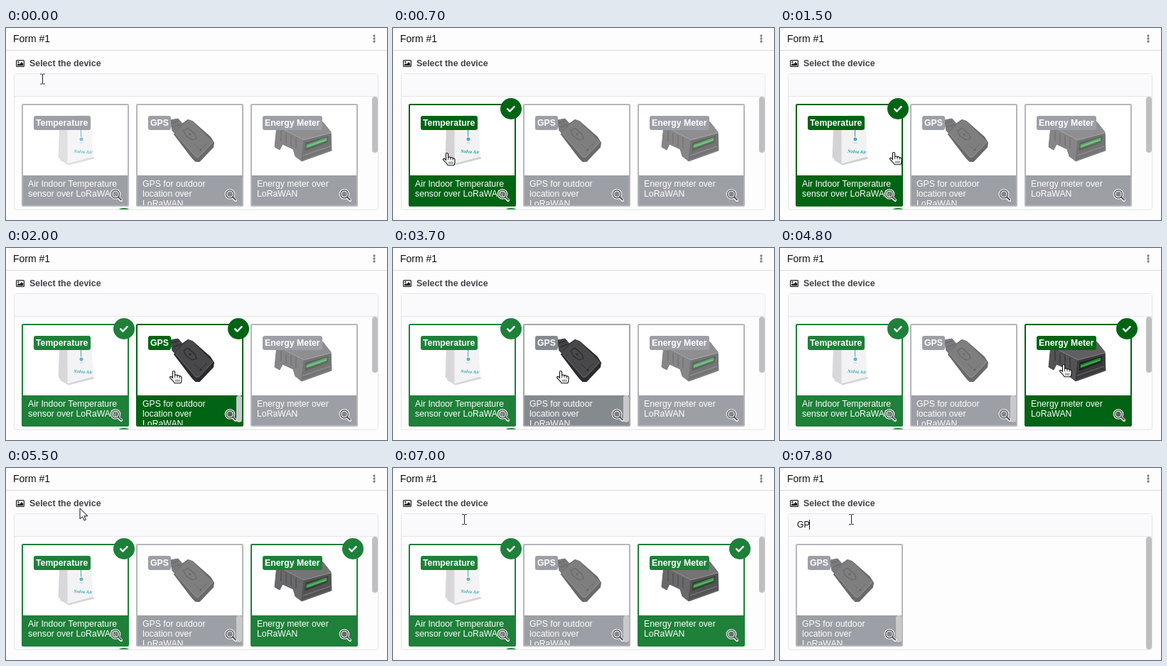
An HTML page for the animation above (8 s loop, 536 by 271 pixels).

```html
<!DOCTYPE html>
<html lang="en">
<head>
<meta charset="utf-8">
<title>Device form</title>
<style>
html, body { margin: 0; width: 100%; height: 100%; overflow: hidden; background: #fefdfe; }
svg { display: block; }
#stage { width: 536px; height: 271px; font: 12.25px "Liberation Sans", Arial, sans-serif; }
.bold { font-weight: bold; }
</style>
</head>
<body>
<svg id="stage" viewBox="0 0 536 271">
  <path d="M0 31.5H536" stroke="#dcdce1"/>
  <text x="10" y="20" font-size="14" fill="#111">Form #1</text>
  <g fill="#808389"><circle cx="518" cy="11" r="1.7"/><circle cx="518" cy="15" r="1.7"/><circle cx="518" cy="19" r="1.7"/></g>
  <rect x="14.6" y="45.6" width="10.8" height="8.8" rx="1" fill="none" stroke="#222" stroke-width="1.2"/>
  <circle cx="17.4" cy="48.2" r="1.1" fill="#222"/>
  <path d="M16 53v-1.6l1.8-1.6 1.2 1.2 3-3 2.2 2.2V53z" fill="#222"/>
  <text x="33" y="54" class="bold" font-size="12.4" fill="#404347">Select the device</text>
  <rect x="11.5" y="64.5" width="512" height="192" rx="3" fill="#fefdfe" stroke="#e5e4e9"/>
  <path d="M12 65H523V96H12z" fill="#faf9fb"/>
  <path d="M12 96.5H523" stroke="#e5e4e9"/>
  <g id="view"></g>
</svg>
<script>
const LOOP = 8000;
const view = document.getElementById('view');

const poly = (points, fill, extra = '') =>
  `<polygon points="${points}" fill="${fill}" stroke="${fill}" stroke-linejoin="round" ${extra}/>`;
const line = (d, color, width = 1) =>
  `<path d="${d}" fill="none" stroke="${color}" stroke-width="${width}" stroke-linecap="round" stroke-linejoin="round"/>`;

// Device drawings, relative to the card's top left corner
const sensor =
  poly('54,79 66,86 102,77 98,73', '#cfcfd2') +
  poly('55,20 66,22 65,83 53,75', '#d3d3d6', 'stroke-width="3"') +
  poly('66,20 95,16 99,73 66,82', '#f2f2f4', 'stroke-width="4"') +
  line('M65 22L64.5 82', '#e2e2e5') +
  line('M83.5 29V46', '#3aa6bd', 1.2) +
  '<circle cx="84" cy="50" r="2" fill="#5bb6c9" stroke="#2b93b0"/>' +
  line('M82 55h4', '#8ccad6', .8) +
  '<text transform="translate(73 69) rotate(3)" font-family="Liberation Serif, serif" font-size="6.6" font-weight="bold" font-style="italic" fill="#1c9bad">Nolva Air</text>';

const tracker =
  poly('48,23 59,21 67,30 56,43 51,38', '#434345') +
  line('M50 27l10 -3M52 33l10 -4', '#252527') +
  poly('54,43 60,51 79,76 84,81 89,81 108,61 109,55 104,47 79,25 73,23 66,28', '#2c2c2e', 'stroke-width="2"') +
  poly('55,41 66,29 74,23 79,25 108,54 88,75 84,75', '#48484a') +
  line('M56 43L84 75 88 75 108 54', '#6b6b6d') +
  line('M67 38L73 34 83 43 85 49 79 51 70 45z', '#2b2b2d', 1.2) +
  line('M82 57l6 6M88 67l11 -11', '#333335') +
  '<circle cx="76" cy="43" r="1.5" fill="#29292b"/><circle cx="91" cy="65" r="1.2" fill="#222"/>';

const meter =
  poly('37,31 44,27 81,22 102,26 113,40 114,66 72,81 63,74 60,64 45,57 41,65 34,61', '#4a4a4d') +
  poly('38,31 81,22 102,26 113,40 75,51', '#606063') +
  poly('37,34 74,52 71,79 64,74 61,63 45,56 41,64 35,60', '#535356') +
  line('M43 38v14M50 42v14M57 45v14M64 48v14', '#38383b', 1.4) +
  poly('75,52 113,42 113,64 72,79', '#3a3a3c') +
  poly('78,55 109,46 108,54 77,66', '#1b251d') +
  poly('79,58 107,48 107,52 79,62', '#218a35') +
  line('M80 60L106 51', '#63bd65') +
  line('M74 73L112 60', '#707073') +
  line('M38 32L75 51 113 41', '#858588');

const devices = {
  temp: { x: 22, label: 'Temperature', width: 80, art: sensor, lines: ['Air Indoor Temperature', 'sensor over LoRaWAN'] },
  gps: { x: 183, label: 'GPS', width: 32, art: tracker, lines: ['GPS for outdoor', 'location over', 'LoRaWAN'] },
  energy: { x: 344, label: 'Energy Meter', width: 84, art: meter, lines: ['Energy meter over', 'LoRaWAN'] }
};

const tick = (x, y, color) =>
  `<circle cx="${x}" cy="${y}" r="15" fill="${color}"/>` +
  line(`M${x - 4.8} ${y + .3}l3.2 3.2 6.2 -6.4`, '#fff', 2.5);

const lens = line('M136 132l4 4', '#fff', 4) +
  '<circle cx="132" cy="127.5" r="5.5" fill="#77777a" fill-opacity=".6" stroke="#fff" stroke-width="3.6"/>' +
  '<circle cx="132" cy="127.5" r="5.5" fill="none" stroke="#505053" stroke-width="1.4"/>' +
  line('M136 131.5l4 4', '#505053', 1.9);

function card(device, x, hover, chosen, bar) {
  const color = chosen ? (hover ? '#006414' : '#1e8039') : (hover ? '#858a8f' : '#9c9fa5');
  const fade = hover ? 1 : chosen ? .87 : .7;
  const text = device.lines.map((s, i) => `<text x="7" y="${16 + 14 * i}" fill="#fff">${s}</text>`).join('');
  return `<g transform="translate(${x} 107)">
    <rect x="1" y="1" width="149" height="143" rx="1" fill="#fff" stroke="${color}" stroke-width="2" stroke-opacity="${chosen ? 1 : .75}"/>
    <g opacity="${fade}">${device.art}</g>
    <rect x="17" y="17" width="${device.width}" height="20" rx="3" fill="${color}"/>
    <text x="20" y="31" class="bold" fill="#fff">${device.label}</text>
    <path d="M2 101H149V143H2z" fill="${color}"/>
    <svg x="2" y="101" width="147" height="42">${text}</svg>
    ${bar ? '<rect x="141" y="101" width="8" height="38" rx="4" fill="#c9c9cb"/>' : ''}
    ${lens}
    ${chosen ? tick(144, 7, color) : ''}
  </g>`;
}

// Pointers, with the hot spot at the origin
const beam = 'M-3 -7h2.2L0 -6.3 .8 -7H3M0 -6.3V6.3M-3 7h2.2L0 6.3 .8 7H3';
const pointers = {
  beam: line(beam, '#fff', 2.4) + line(beam, '#222'),
  arrow: '<path d="M0 0V15L3.5 11.8 6 17 8.3 16 6 10.8H10.8z" fill="#fff" stroke="#111"/>',
  hand: '<path d="M-1.5 1.8Q-1.5 .5 0 .5T1.6 2V7.2Q2 6 3.4 6T5 7.2Q5.5 6.5 6.7 6.7T8.2 8.2Q8.8 7.6 9.8 8T11 9.6V13Q11 15.5 9.8 17.8H1.2Q0 15.5 -2 13.6L-5 10.6Q-6 9.5 -5 8.7T-2.6 9.2L-1.5 10.3z" fill="#fff" stroke="#111" stroke-width="1.1"/>' +
    line('M1.6 7v3M5 7.5v2.5M8.2 8.5v2M3 13v2.5M5.2 13v2.5M7.4 13v2.5', '#111', .8)
};

// time, pointer, x, y, hovered device
const moves = [
  [0, 'beam', 51.5, 72],
  [100, 'beam', 240, 82],
  [200, 'hand', 110, 160, 'temp'],
  [300, 'hand', 76, 176, 'temp'],
  [1300, 'hand', 82, 176, 'temp'],
  [1400, 'hand', 112, 176, 'temp'],
  [1500, 'hand', 160, 175, 'temp'],
  [1600, 'hand', 218, 174, 'gps'],
  [1700, 'hand', 236, 173, 'gps'],
  [4100, 'hand', 256, 174, 'gps'],
  [4200, 'hand', 316, 173, 'gps'],
  [4300, 'hand', 378, 171, 'energy'],
  [4400, 'hand', 398, 169, 'energy'],
  [4700, 'hand', 398, 166, 'energy'],
  [4800, 'hand', 399, 164, 'energy'],
  [5100, 'hand', 388, 145, 'energy'],
  [5200, 'arrow', 320, 99],
  [5300, 'beam', 205, 74],
  [5400, 'arrow', 126, 37],
  [5500, 'arrow', 104, 57],
  [5700, 'beam', 100.5, 75],
  [6500, 'beam', 100.5, 72.5]
];

const within = (t, from, to) => t >= from && t < to;

function draw(t) {
  const [, pointer, px, py, hovered] = moves.filter(m => m[0] <= t).pop();
  const chosen = { temp: t >= 700, gps: within(t, 2000, 3700), energy: t >= 4400 };
  const show = (key, x = devices[key].x) =>
    card(devices[key], x, hovered === key, chosen[key], key === 'gps' && t >= 1600);

  const query = t >= 7800 ? 'GP' : t >= 7500 ? 'G' : '';
  const cards = query === 'GP' ? show('gps', 22)
    : query ? show('gps', 22) + show('energy', 183)
    : tick(166, 269, '#1e8039') + show('temp') + show('gps') + show('energy');
  const caret = query ? { G: 33.5, GP: 41.5 }[query] : within(t, 6300, 7000) ? 24.5 : 0;

  return `<svg x="12" y="97" width="511" height="159" viewBox="12 97 511 159">${cards}
      <rect x="515" y="97" width="8" height="${query ? 159 : 79}" rx="4" fill="#bfbfc2"/></svg>
    <text x="24" y="84" fill="#111">${query}</text>
    ${caret ? `<path d="M${caret} ${query ? 73 : 74}v14" stroke="#111"/>` : ''}
    <g transform="translate(${px} ${py})">${pointers[pointer]}</g>`;
}

let last = '';
function frame() {
  const next = draw(performance.now() % LOOP);
  if (next !== last) view.innerHTML = last = next;
  requestAnimationFrame(frame);
}
frame();
</script>
</body>
</html>
```
